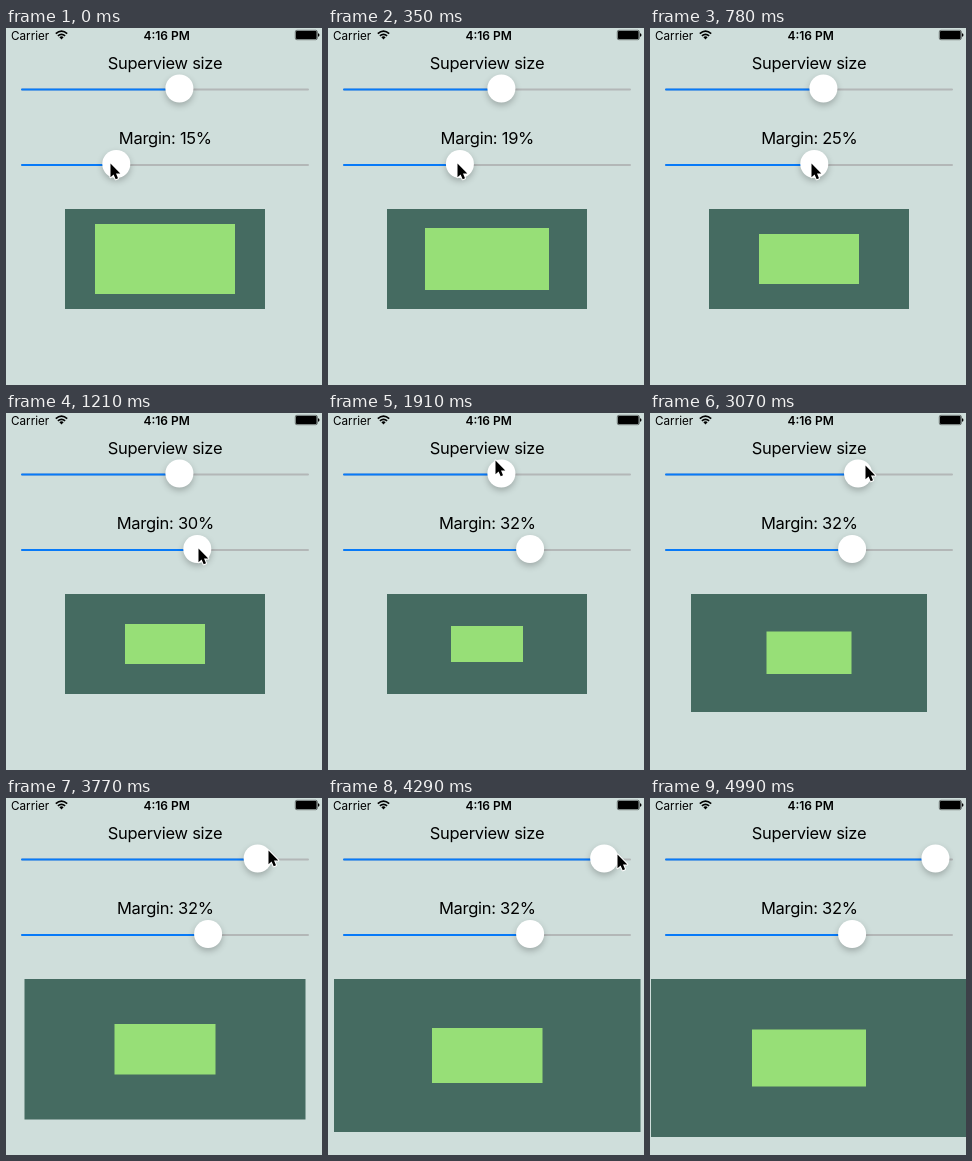
An HTML page that plays this animation: 316 px wide and 357 px high, repeating every 5530 ms.

```html
<!DOCTYPE html>
<html lang="en">
<head>
<meta charset="utf-8">
<title>Margin sliders</title>
<style>
  html, body { margin: 0; width: 100%; height: 100%; overflow: hidden; background: #cfdedb; }
  svg { display: block; width: 316px; height: 357px; }
  text { font-family: Inter, Roboto, sans-serif; text-anchor: middle; }
  .title { font-size: 16.5px; letter-spacing: -.28px; }
  .status { font-size: 11.7px; }
  .rail { fill: #b3b7b7; }
  .fill { fill: #087af8; }
  .thumb { fill: #fff; filter: drop-shadow(0 3px 3px rgba(0, 0, 0, .23)); }
</style>
</head>
<body>
<svg viewBox="0 0 316 357">
  <rect width="316" height="357" fill="#cfdedb"/>

  <text class="status" x="5" y="11.5" style="text-anchor: start">Carrier</text>
  <g fill="none" stroke="#000" stroke-width="1.7">
    <path d="M49.8 5.7Q55.5 .7 61.2 5.7M51.9 7.9Q55.5 4.7 59.1 7.9"/>
    <path d="M53.4 9.2Q55.5 7.4 57.6 9.2L55.5 11.4Z" fill="#000" stroke="none"/>
  </g>
  <text class="status" x="160.6" y="11.5" font-weight="600" style="font-size: 12px">4:16 PM</text>
  <rect x="289.3" y="2.3" width="22" height="9.4" rx="1.6" fill="none" stroke="#000" stroke-width=".5"/>
  <rect x="290" y="3" width="20.6" height="8" rx=".8"/>
  <path d="M312 5.2q1.5 .3 1.5 1.8t-1.5 1.8z"/>

  <text class="title" x="159" y="41">Superview size</text>
  <rect class="rail" x="15" y="60.5" width="288" height="2" rx="1"/>
  <rect class="fill" id="sizeFill" x="15" y="60.5" height="2" rx="1"/>
  <circle class="thumb" id="sizeThumb" cy="60.5" r="14"/>

  <text class="title" id="label" x="159.3" y="116"></text>
  <rect class="rail" x="15" y="136" width="288" height="2" rx="1"/>
  <rect class="fill" id="marginFill" x="15" y="136" height="2" rx="1"/>
  <circle class="thumb" id="marginThumb" cy="136" r="14"/>

  <rect id="outer" fill="#456b61"/>
  <rect id="inner" fill="#97df77"/>

  <path id="cursor" d="M0 0V13.8L3.1 11L5.2 15.8L7.5 14.8L5.5 10H9.8Z"
        stroke="#fff" stroke-width="2" stroke-linejoin="round" paint-order="stroke"/>
</svg>
<script>
const LOOP = 5530, TICKS = 63, STEP = LOOP / TICKS;
const LEAD = 28; // ms by which each tick starts early
const CENTER = 159, TOP = 181;
const $ = id => document.getElementById(id);

const ramp = (t, from, to) => Math.min(1, Math.max(0, (t - from) / (to - from)));
const smooth = p => p * p * (3 - 2 * p);
const easeOut = p => 1 - (1 - p) ** 1.41;
const snap = v => Math.round(v * 2) / 2;

function set(id, attrs) {
  for (const name in attrs) $(id).setAttribute(name, attrs[name]);
}

function slide(name, x) {
  set(name + "Fill", { width: x - 15 });
  set(name + "Thumb", { cx: x });
}

function box(id, width, scale) {
  const w = width * scale, h = w / 2;
  set(id, {
    x: snap(CENTER - w / 2), y: snap(TOP + width / 4 - h / 2),
    width: snap(w), height: snap(h)
  });
}

function draw(tick) {
  const margin = Math.min(32, Math.round(15 + 1.07 * tick));
  const grown = 116 * easeOut(ramp(tick, 29.6, 53));
  slide("margin", 29.3 + 5.4 * margin);
  slide("size", 173.4 + .966 * grown);
  box("outer", 200 + grown, 1);
  box("inner", 200 + grown, 1 - margin / 50);
  $("label").textContent = `Margin: ${margin}%`;

  // The pointer drags the lower thumb, moves up, drags the upper one, then drops
  const lift = smooth(ramp(tick, 16, 21.3)), grab = ramp(tick, 22, 26);
  const x = 104 + 101 * ramp(tick, 0, 16) - 38 * lift + 10 * grab + 1.05 * grown;
  const y = 135 - 88 * lift + 5 * grab + 7 * ramp(tick, 43, 53) + 119 * ramp(tick, 53, 56);
  set("cursor", {
    transform: `translate(${Math.round(x) + .5} ${Math.round(y) + .5})`,
    visibility: tick < 57 ? "visible" : "hidden"
  });
}

let shown = -1;
function frame() {
  const t = performance.now() % LOOP;
  const tick = Math.min(TICKS - 1, Math.floor((t + LEAD) / STEP));
  if (tick !== shown) draw(shown = tick);
  requestAnimationFrame(frame);
}
frame();
</script>
</body>
</html>
```
